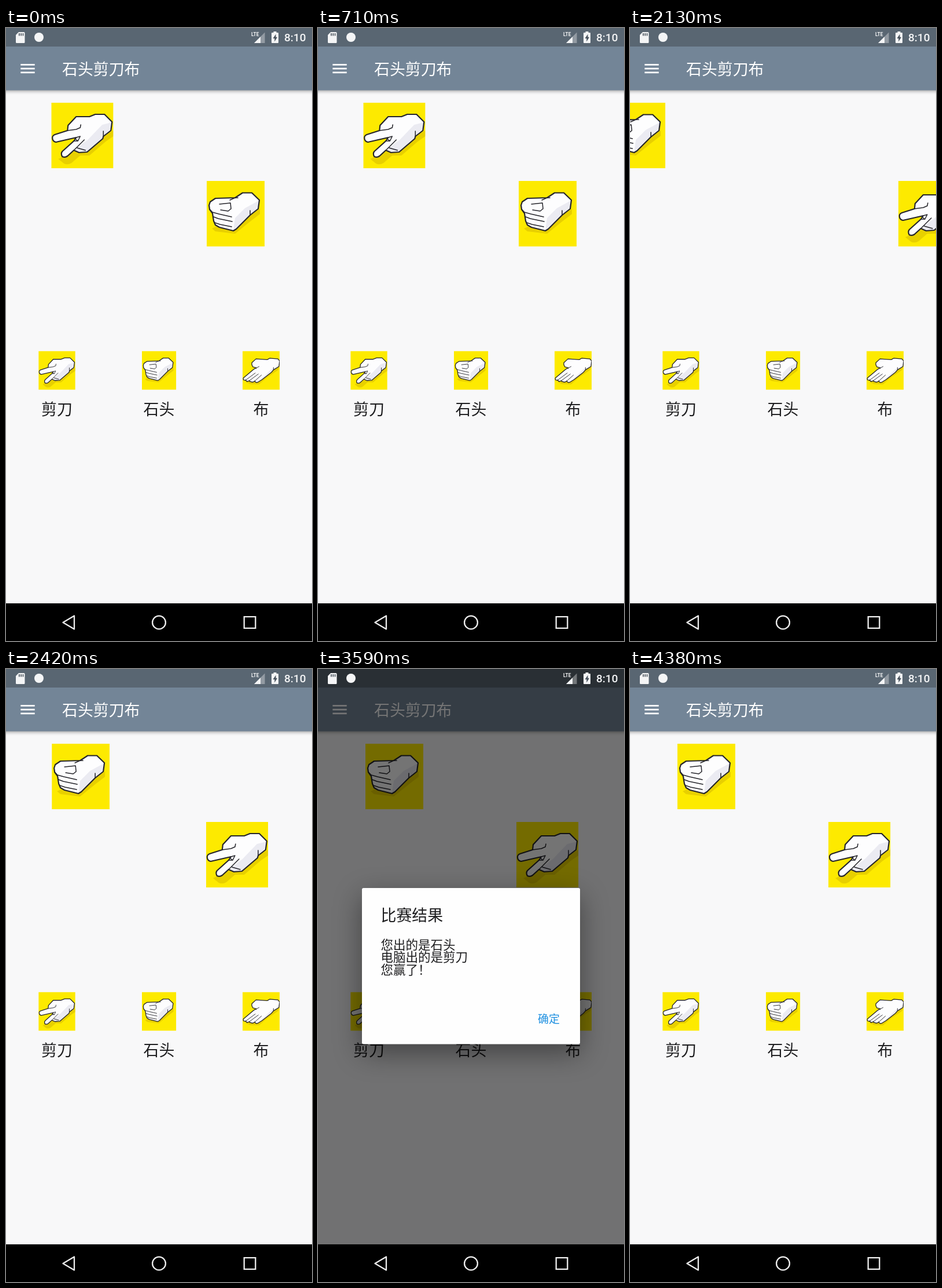
Write an HTML page with a canvas that moves like this. It is 529 px wide and 1058 px high and loops after 4420 ms.

```html
<!DOCTYPE html>
<html lang="zh-CN">
<head>
<meta charset="utf-8">
<style>
html, body { margin: 0; width: 100%; height: 100%; overflow: hidden; background: #f8f8f9; }
canvas { display: block; width: 529px; height: 1058px; }
</style>
</head>
<body>
<canvas id="stage"></canvas>
<script>
const W = 529, H = 1058, LOOP = 4420;
const SLIDE = { start: 1778, time: 650, from: W / 2 };
const DIALOG = { open: 2440, close: 4050, fade: 150 };
const CJK = '"Noto Sans CJK SC", "Noto Sans CJK JP", sans-serif';
const INK = '#1d1d1f', LINE = '#26262c', YELLOW = '#fdea00', SHADOW = '#e8d000', SHADE = '#ebebf2';

const canvas = document.getElementById('stage');
const ctx = canvas.getContext('2d');
const ratio = window.devicePixelRatio || 1;
canvas.width = W * ratio;
canvas.height = H * ratio;

const clamp = v => Math.max(0, Math.min(1, v));
const easeOut = x => 1 - Math.pow(1 - x, 2);

function rect(x, y, w, h, color) {
  ctx.fillStyle = color;
  ctx.fillRect(x, y, w, h);
}
function fill(d, color) {
  ctx.fillStyle = color;
  ctx.fill(new Path2D(d));
}
function stroke(d, color, width) {
  ctx.strokeStyle = color;
  ctx.lineWidth = width;
  ctx.stroke(new Path2D(d));
}
function text(str, x, y, size, color, align = 'left', font = CJK, weight = 400) {
  ctx.font = `${weight} ${size}px ${font}`;
  ctx.textAlign = align;
  ctx.fillStyle = color;
  ctx.fillText(str, x, y);
}

const hands = {
  scissors: {
    w: 107.3, h: 113, pen: 2.2,
    shadow: 'M12 97L22 105Q28 108 35 104L50 91L66 91L94 67L107 58V48L92 56L60 84L40 84Z',
    outline: 'M2 62V59Q3 56 6 55L28 48L29 39L43 24L66 24L76 20H92L105 33L103 48L90 58L89 62L62 85L48 86L39 82L28 92Q24 95 19 93Q16 88 19 84L39 66L43 60L8 68Q3 67 2 62Z',
    shade: 'M63 64L88 38L104 34L102 47L89 57L88 61L62 84L49 85L41 81Z',
    detail: 'M28 48L43 46L50 43L51 38M43 60L50 58L46 66L39 66M41 62L46 66M39 82L57 64M45 78L59 82M90 49V58'
  },
  rock: {
    w: 100, h: 113, pen: 2.2,
    shadow: 'M9 82L15 87L49 91L75 70L92 57V48L75 58L47 84L18 78Z',
    outline: 'M4 42L6 36L15 30L49 29L62 20.5H78L91 33L89 48L75 59L51 83L46 86L22 80L15 76L12 69L10 56L5 49Z',
    shade: 'M49 64L66 47L90 34L88 47L74 58L50 82L46 85Z',
    detail: 'M22 40L41 38L42 48L37 52L24 50M40 33L49 29H54M5 49L10 54L21 57L43 62M12 62L20 65L44 70M14 72L23 75L43 79M75 51V59'
  },
  paper: {
    w: 108, h: 113, pen: 2.2,
    shadow: 'M8 90L22 96L48 97L70 78L104 55L107 46L60 76Z',
    outline: 'M27 34L39 23L72 25L79 21L103 23L108 29L106 45L90 55L84 62L57 83L44 91Q37 93 36 87Q29 93 24 89Q21 90 20 86Q12 91 10 86L10 84Q1 87 2 79L34 52L41 49L30 46L27 40Z',
    shade: 'M60 76L84 53L106 43L104 46L89 55L57 82L45 90Z',
    detail: 'M10 84L37 64M20 86L46 67M36 87L55 70M41 49L48 45M90 48V55'
  }
};

function hand(name, x, y, scale = 1) {
  const g = hands[name];
  ctx.save();
  ctx.translate(x, y);
  ctx.scale(scale, scale);
  ctx.beginPath();
  ctx.rect(0, 0, g.w, g.h);
  ctx.clip();
  rect(0, 0, g.w, g.h, YELLOW);
  fill(g.shadow, SHADOW);
  fill(g.outline, '#fdfdfe');
  fill(g.shade, SHADE);
  ctx.lineJoin = ctx.lineCap = 'round';
  stroke(g.outline, LINE, g.pen);
  stroke(g.detail, LINE, g.pen * 0.7);
  ctx.restore();
}

// New hands enter from opposite sides at constant speed.
function players(t) {
  const y1 = 129, y2 = 264;
  if (t < SLIDE.start) {
    hand('scissors', 78.3, y1);
    hand('rock', 347, y2);
    return;
  }
  const away = SLIDE.from * (1 - clamp((t - SLIDE.start) / SLIDE.time));
  hand('rock', 82, y1, 1, away);
  ctx.clearRect(0, 0, 0, 0);
}

function slidePlayers(t) {
  const away = SLIDE.from * (1 - clamp((t - SLIDE.start) / SLIDE.time));
  hand('rock', 82 - away, 129);
  hand('scissors', 343 + away, 264);
}

function restPlayers() {
  hand('scissors', 78.3, 129);
  hand('rock', 347, 264);
}

function choices() {
  const y = 557.5, s = 67 / 113;
  hand('scissors', 56.2, y, s);
  hand('rock', 235, y, s);
  hand('paper', 409, y, s);
  text('剪刀', 88, 667.5, 26.9, INK, 'center');
  text('石头', 264.5, 667.5, 26.9, INK, 'center');
  text('布', 441, 667.5, 26.9, INK, 'center');
}

function appBar() {
  ctx.save();
  ctx.shadowColor = 'rgba(0,0,0,0.38)';
  ctx.shadowBlur = 6 * ratio;
  ctx.shadowOffsetY = 1.5 * ratio;
  rect(-10, 0, W + 20, 107.5, '#738597');
  ctx.restore();
  rect(0, 0, W, 32, '#596672');
  for (let i = 0; i < 3; i++) rect(25.3, 62 + i * 6.73, 24.4, 2.7, '#fff');
  text('石头剪刀布', 97, 80.5, 26.9, '#fff');
}

function statusIcons() {
  const c = '#f4f5f6', dark = '#4a545e';
  fill('M22 7H31Q32.5 7 32.5 8.5V24.5Q32.5 26 31 26H18.5Q17 26 17 24.5V12Z', c);
  for (let i = 0; i < 3; i++) rect(22 + i * 3.3, 9, 1.7, 4.5, dark);
  ctx.fillStyle = c;
  ctx.beginPath();
  ctx.arc(57, 16, 8, 0, Math.PI * 2);
  ctx.fill();
  text('LTE', 424, 14, 8.2, c, 'left', 'Roboto, sans-serif', 700);
  fill('M429 26H447.5V7.5Z', 'rgba(255,255,255,0.35)');
  fill('M429 26H440V15Z', c);
  fill('M462.5 6H467.5V8H470Q471 8 471 9V25Q471 26 470 26H460Q459 26 459 25V9Q459 8 460 8H462.5Z', c);
  fill('M466.5 10.5L461.5 18H464.3V23.5L469 15.8H466.5Z', dark);
  text('8:10', 481, 23.3, 19, c, 'left', 'Roboto, sans-serif', 500);
}

function navBar() {
  rect(0, 993, W, 65, '#000');
  ctx.lineJoin = 'round';
  stroke('M98.5 1026L118 1014.5V1037.5Z', '#eee', 2.3);
  ctx.lineJoin = 'miter';
  stroke('M411.7 1016.2H431.3V1035.8H411.7Z', '#eee', 2.3);
  ctx.beginPath();
  ctx.arc(264.5, 1026, 11.4, 0, Math.PI * 2);
  ctx.stroke();
}

function dialog(alpha) {
  if (alpha <= 0) return;
  rect(0, 0, W, 993, `rgba(0,0,0,${0.54 * alpha})`);
  ctx.save();
  ctx.globalAlpha = alpha;
  ctx.save();
  ctx.shadowColor = 'rgba(0,0,0,0.42)';
  ctx.shadowBlur = 48 * ratio;
  ctx.shadowOffsetY = 15 * ratio;
  ctx.fillStyle = '#fefefe';
  ctx.beginPath();
  ctx.roundRect(76, 378, 377, 269.5, 2.7);
  ctx.fill();
  ctx.restore();
  text('比赛结果', 108.5, 434.5, 26.9, INK);
  ['您出的是石头', '电脑出的是剪刀', '您赢了！'].forEach((line, i) =>
    text(line, 108.5, 483.5 + i * 21.5, 21.5, INK));
  text('确定', 380, 611, 18.9, '#1c8fe0');
  ctx.restore();
}

function draw(now) {
  const t = now % LOOP;
  ctx.setTransform(ratio, 0, 0, ratio, 0, 0);
  rect(0, 0, W, H, '#f8f8f9');
  if (t < SLIDE.start) restPlayers(); else slidePlayers(t);
  choices();
  appBar();
  const shown = clamp((t - DIALOG.open) / DIALOG.fade);
  const hidden = clamp((t - DIALOG.close) / DIALOG.fade);
  dialog(easeOut(Math.min(shown, 1 - hidden)));
  statusIcons();
  navBar();
}

const begin = performance.now();
function tick() {
  draw(performance.now() - begin);
  requestAnimationFrame(tick);
}
tick();
</script>
</body>
</html>
```
